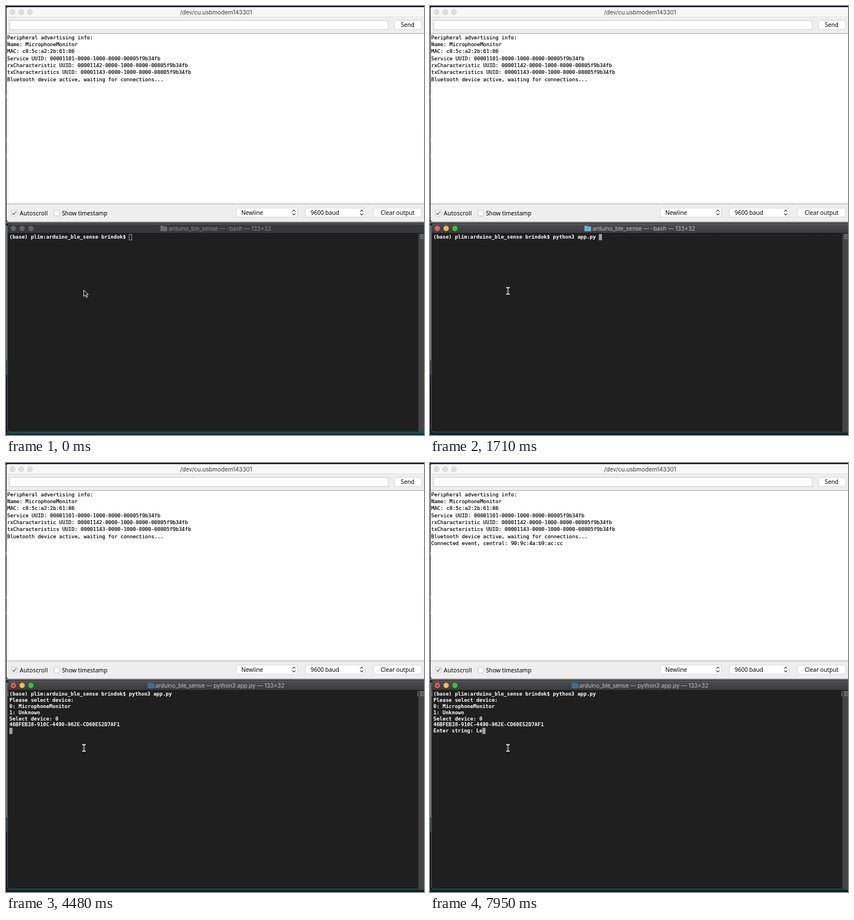
Write an HTML page that moves like this. It is 739 px wide and 758 px high and loops after 8000 ms.

```html
<!DOCTYPE html>
<html lang="en">
<head>
<meta charset="utf-8">
<title>Serial monitor and terminal</title>
<style>
  html, body { margin: 0; width: 100%; height: 100%; overflow: hidden; background: #10131d; }
  svg { display: block; width: 739px; height: 758px; }
  text { white-space: pre; }
  .mono { font: 9px "DejaVu Sans Mono", monospace; }
  .bold { font-weight: 700; fill: #fff; }
  .ui { font: 500 10.2px "Noto Sans", sans-serif; fill: #000; }
  .title { font: 10px Inter, sans-serif; text-anchor: middle; }
  .mid { text-anchor: middle; }
  .button { fill: #fff; stroke: #cbcbcb; stroke-width: .8; }
  .check { fill: #fff; stroke: #b4b4b4; stroke-width: .8; }
  .mark { fill: none; stroke: #333; stroke-width: 1.1; stroke-linecap: round; stroke-linejoin: round; }
</style>
</head>
<body>
<svg viewBox="0 0 739 758">
  <defs>
    <linearGradient id="bar" x2="0" y2="1">
      <stop stop-color="#4b4c4e"/><stop offset="1" stop-color="#3a3b3d"/>
    </linearGradient>
    <linearGradient id="gap" x2="0" y2="1">
      <stop stop-color="#a0a0a0"/><stop offset=".6" stop-color="#1a1a1c"/>
    </linearGradient>
  </defs>

  <!-- desktop -->
  <rect width="739" height="758" fill="#10131d"/>
  <path d="M0 157v6M0 235v5M0 262v5" stroke="#2f6fb0" stroke-width="2"/>
  <rect y="381" width="739" height="7" fill="url(#gap)"/>
  <rect y="388" width="2.5" height="238" fill="#6c6e70"/>
  <rect id="patch" y="626" width="2.5" height="26"/>
  <rect id="floor" y="753" width="739" height="4"/>

  <!-- serial monitor -->
  <path d="M1 5q0-3 3-3h735v379H5q-4 0-4-4z" fill="#eeeeee"/>
  <path d="M1 5q0-3 3-3h735v17H1z" fill="#f7f7f7"/>
  <path d="M1 19.4h738" stroke="#dadada" stroke-width=".8"/>
  <g fill="#dedede" stroke="#cacaca" stroke-width=".7">
    <circle cx="11.5" cy="11" r="4.6"/><circle cx="27" cy="11" r="4.6"/><circle cx="42.3" cy="11" r="4.6"/>
  </g>
  <text class="title" x="371.5" y="14.7" fill="#3c3c3c" style="font-size: 10.25px">/dev/cu.usbmodem143301</text>
  <rect x="6.4" y="25.4" width="669.2" height="16.2" fill="#fff" stroke="#c6c6c6" stroke-width=".8"/>
  <rect x="1" y="48" width="738" height="302" fill="#fff"/>
  <path d="M1 48.5h738M1 349.6h738" stroke="#a9a9a9"/>
  <g id="serial" class="mono" fill="#000" stroke="#000" stroke-width=".2"></g>

  <rect class="button" x="686.5" y="25.2" width="48.5" height="16" rx="3"/>
  <text class="ui mid" x="710" y="36.6">Send</text>
  <rect class="check" x="9.6" y="361" width="10" height="10" rx="1.5"/>
  <path class="mark" d="M12 366.2l2 2.3 3.6-5"/>
  <text class="ui" x="24.2" y="370" letter-spacing=".2">Autoscroll</text>
  <rect class="check" x="84.8" y="361" width="10" height="10" rx="1.5"/>
  <text class="ui" x="99" y="370">Show timestamp</text>
  <rect class="button" x="407" y="357" width="108.3" height="16" rx="3"/>
  <text class="ui" x="416" y="368.6">Newline</text>
  <path class="mark" d="M506.6 363l2.4-2.6 2.4 2.6M506.6 366.8l2.4 2.6 2.4-2.6"/>
  <rect class="button" x="529" y="357" width="106" height="16" rx="3"/>
  <text class="ui" x="538.6" y="368.6">9600 baud</text>
  <path class="mark" d="M626.4 363l2.4-2.6 2.4 2.6M626.4 366.8l2.4 2.6 2.4-2.6"/>
  <rect class="button" x="650" y="357" width="85" height="16" rx="3"/>
  <text class="ui mid" x="692.3" y="368.6">Clear output</text>

  <!-- terminal -->
  <path d="M2.5 390q0-5 5-5H739v368H6.5q-4 0-4-4z" fill="#1f1f1f"/>
  <path id="head" d="M2.5 402v-12q0-5 5-5H739v17z"/>
  <path d="M2.5 401.6H739" stroke="#0c0c0c" stroke-width=".8"/>
  <path d="M739 385.4H7.5q-5 0-5 5V749q0 4 4 4H739" fill="none" stroke="#6b6d6f" stroke-width=".8"/>
  <rect x="729" y="402" width="10" height="350.6" fill="#454545"/>
  <path d="M729.3 402v350" stroke="#393939" stroke-width=".8"/>
  <path d="M740 404.5h-6.5v6.5h6.5M735 407.7h5" fill="none" stroke="#a2a2a2" stroke-width=".9"/>
  <g id="lights">
    <circle cx="13" cy="393" r="4.7"/><circle cx="28.5" cy="393" r="4.7"/><circle cx="44" cy="393" r="4.7"/>
  </g>
  <circle id="busy" cx="13" cy="393" r="1.6" fill="#6d0d0a"/>
  <path id="folder" d="M0 1q0-1 1-1h3.5l1.2 1.4H11q1 0 1 1V9q0 1-1 1H1q-1 0-1-1z"/>
  <text id="name" class="title" x="378" y="396.8"></text>
  <g id="shell" class="mono bold"></g>
  <g id="brackets" class="mono" fill="#a0a0a0">
    <text x="1.3" y="411.2">[</text><text x="725" y="411.2">]</text>
  </g>
  <rect id="caret"/>

  <path id="arrow" d="M137.5 502v11.2l2.6-2.5 1.9 4.3 2-.9-1.9-4.2h3.5z" fill="#111" stroke="#f4f4f4" stroke-width="1"/>
  <g id="beam" fill="none" stroke-linecap="round">
    <path id="stem" d="M135.6 497.6q2.2 0 2.2 1.6v8.4q0 1.6-2.2 1.6M140 497.6q-2.2 0-2.2 1.6v8.4q0 1.6 2.2 1.6M136.8 503.5h2" stroke="#e2e2e2" stroke-width="2.1"/>
    <path d="M137.8 499v9M136.8 503.5h2" stroke="#222" stroke-width=".8"/>
  </g>
</svg>
<script>
const LOOP = 8000, COL = 5.418, ROW = 10.83;
const FOCUS = 60, ENTER = 1760, RUN = 2120;
const $ = id => document.getElementById(id);

// [time, text added to the output]
const shellLog = [
  [0, '(base) plim:arduino_ble_sense brindok$ '],
  ...[...'python'].map((key, i) => [760 + 84 * i, key]),
  [1290, '3'], [1410, ' '], [1530, 'a'], [1710, 'pp.py '],
  [2000, '\n'],
  [2890, 'Please select device:\n0: MicrophoneMonitor\n1: Unknown\nSelect device: '],
  [4180, '0'],
  [4480, '\n46BFEB38-910C-4490-962E-CD60E52D7AF1\n'],
  [5830, 'Enter string: '],
  [7830, 'L'], [7950, 'e']
];
const serialLog = [
  [0, `Peripheral advertising info:
Name: MicrophoneMonitor
MAC: c8:5c:a2:2b:61:86
Service UUID: 00001101-0000-1000-8000-00805f9b34fb
rxCharacteristic UUID: 00001142-0000-1000-8000-00805f9b34fb
txCharacteristics UUID: 00001143-0000-1000-8000-00805f9b34fb
Bluetooth device active, waiting for connections...`],
  [6890, '\nConnected event, central: 90:9c:4a:b9:ac:cc']
];

const linesAt = (log, t) =>
  log.filter(([start]) => start <= t).map(([, text]) => text).join('').split('\n');

function set(id, attrs) {
  for (const key in attrs) $(id).setAttribute(key, attrs[key]);
}

function show(id, on) {
  $(id).style.display = on ? '' : 'none';
}

function makeRows(id, count, x, y, pitch) {
  return Array.from({ length: count }, (_, i) => {
    const row = document.createElementNS('http://www.w3.org/2000/svg', 'text');
    row.setAttribute('x', x);
    row.setAttribute('y', y + i * pitch);
    return $(id).appendChild(row);
  });
}

function fill(rows, lines) {
  rows.forEach((row, i) => {
    const text = lines[i] || '';
    if (row.textContent !== text) row.textContent = text;
  });
}

const serialRows = makeRows('serial', 8, 2, 58.6, 12.35);
const shellRows = makeRows('shell', 7, 6, 411.2, ROW);
const lights = [...$('lights').children];

function draw(t) {
  const active = t >= FOCUS, running = t >= RUN;
  const lines = linesAt(shellLog, t);
  fill(serialRows, linesAt(serialLog, t));
  fill(shellRows, lines);

  const last = lines.length - 1;
  const inset = active ? 0 : 0.5;
  set('caret', {
    x: 6 + lines[last].length * COL + inset,
    y: 403 + last * ROW + inset,
    width: COL - 2 * inset,
    height: ROW - 2 * inset,
    fill: active ? '#a3a3a3' : 'none',
    stroke: active ? 'none' : '#a3a3a3'
  });

  const colours = active ? ['#fc5b57', '#fdbc2e', '#28c840'] : ['#636466', '#636466', '#636466'];
  lights.forEach((light, i) => light.setAttribute('fill', colours[i]));
  set('head', { fill: active ? 'url(#bar)' : '#38393b' });
  set('folder', {
    transform: `translate(${running ? 250.5 : 273} 388)`,
    fill: running ? '#416f92' : active ? '#61b4d8' : '#6c6d6e'
  });
  set('name', { fill: active ? '#c0c1c2' : '#88898b' });
  $('name').textContent = `arduino_ble_sense — ${running ? 'python3 app.py' : '-bash'} — 133×32`;
  set('patch', { fill: active ? '#263c49' : '#1b4a58' });
  set('floor', { fill: active ? '#08292b' : '#0a4446' });

  show('busy', running);
  show('brackets', t >= ENTER);
  show('arrow', !active);
  show('beam', active);
}

function tick() {
  draw(performance.now() % LOOP);
  requestAnimationFrame(tick);
}
tick();
</script>
</body>
</html>
```
